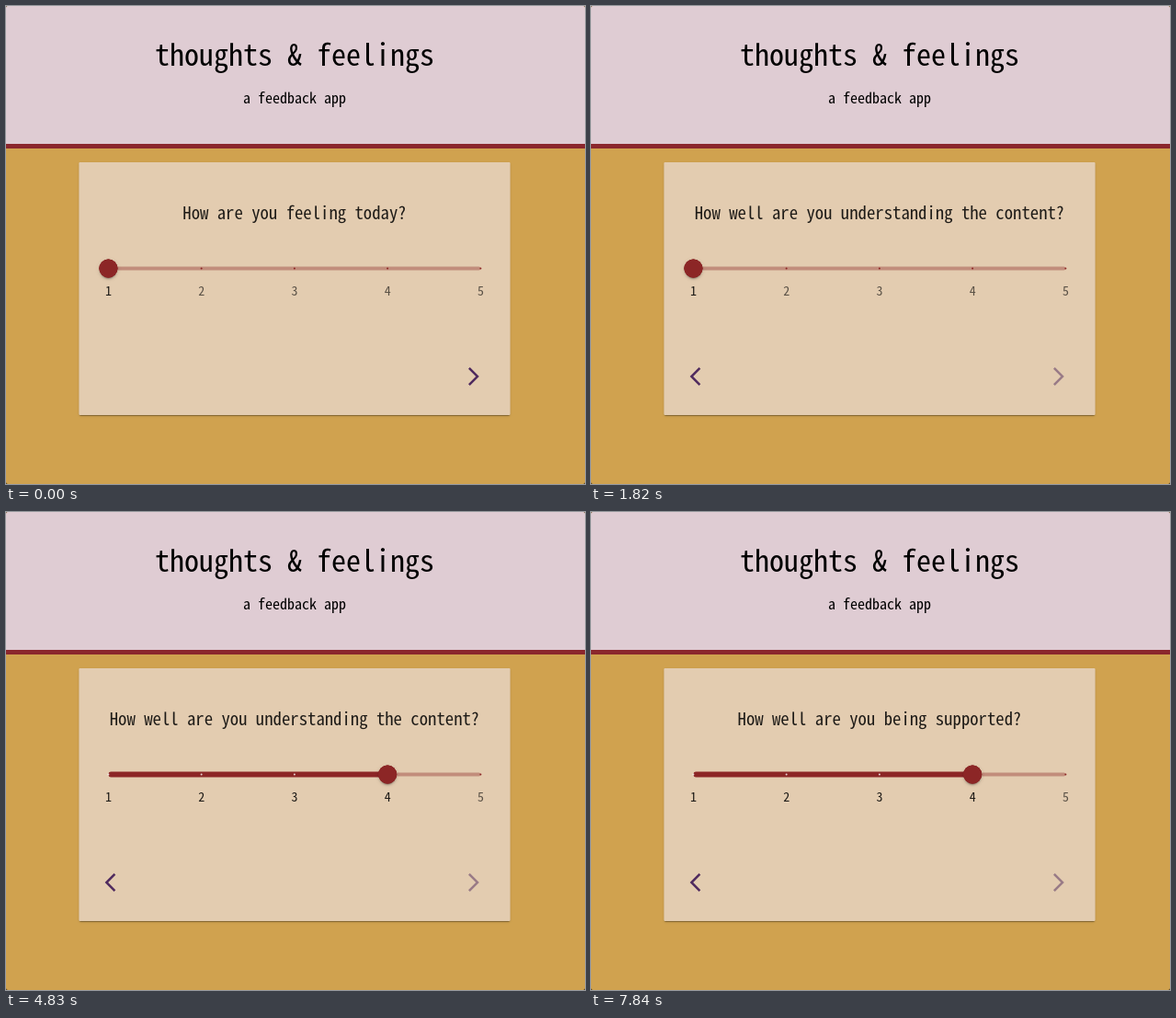
Write an HTML page with a canvas that moves like this. It is 630 px wide and 520 px high and loops after 8000 ms.

```html
<!DOCTYPE html>
<html lang="en">
<head>
<meta charset="utf-8">
<title>thoughts &amp; feelings</title>
<style>
  html, body { margin: 0; width: 100%; height: 100%; overflow: hidden; background: #2b2119; }
  canvas, svg { position: absolute; left: 0; top: 0; width: 630px; height: 520px; }
  text {
    font-family: "Noto Sans Mono CJK JP", "Noto Sans Mono CJK SC", "Noto Sans Mono", "DejaVu Sans Mono", monospace;
    font-size: calc(var(--size) * var(--fit, 1));
    text-anchor: middle;
    white-space: pre;
  }
  .title { --size: 32px; }
  .sub { --size: 16px; }
  .question { --size: 18.72px; fill-opacity: .87; }
  .label { --size: 14px; }
</style>
</head>
<body>
<canvas width="630" height="520"></canvas>
<svg viewBox="0 0 630 520">
  <text class="title" x="314" y="64.5">thoughts &amp; feelings</text>
  <text class="sub" x="314" y="105.5">a feedback app</text>
  <text class="question" x="314" y="232"></text>
</svg>
<script>
const LOOP = 8000, STEP = 70, EASE_MS = 150;
const RED = '#8c2626', CARD = '#e3ccb0', PURPLE = '#4f2a5e';
const LEFT = 111.4, GAP = 101.25, RAIL_Y = 285.5;
const NEXT = new Path2D('M6.23 20.23 8 22l10-10L8 2 6.23 3.77 14.46 12z');
const BACK = new Path2D('M11.67 3.87 9.9 2.1 0 12l9.9 9.9 1.77-1.77L3.54 12z');

// slide: thumb leaves 1; calm: halo fades; hover / unhover: next arrow dims and recovers
const pages = [
  { from: 0, text: 'How are you feeling today?', slide: 413, calm: 765, unhover: 0, hover: 980 },
  { from: 1820, text: 'How well are you understanding the content?', slide: 3405, calm: 3848, unhover: 2240, hover: 4830 },
  { from: 5950, text: 'How well are you being supported?', slide: 6925, calm: 7550, unhover: 6370, hover: 7840 }
];

const ctx = document.querySelector('canvas').getContext('2d');
const svg = document.querySelector('svg');
const question = document.querySelector('.question');

// Keep the half-em pitch whichever monospaced font is present.
ctx.font = '100px ' + getComputedStyle(question).fontFamily;
svg.style.setProperty('--fit', 50 / ctx.measureText('0').width);

const stopX = i => LEFT + i * GAP;
const labels = [0, 1, 2, 3, 4].map(i => {
  const el = document.createElementNS('http://www.w3.org/2000/svg', 'text');
  el.setAttribute('class', 'label');
  el.setAttribute('x', stopX(i));
  el.setAttribute('y', 314.5);
  el.textContent = i + 1;
  return svg.appendChild(el);
});

// cubic-bezier(.4, 0, .2, 1)
function ease(x) {
  if (x <= 0) return 0;
  if (x >= 1) return 1;
  let lo = 0, hi = 1;
  for (let i = 0; i < 24; i++) {
    const s = (lo + hi) / 2, r = 1 - s;
    if (1.2 * r * r * s + 0.6 * r * s * s + s * s * s < x) lo = s; else hi = s;
  }
  return lo * lo * (3 - 2 * lo);
}

function fillRound(x, y, w, h, r, color) {
  ctx.fillStyle = color;
  ctx.beginPath();
  ctx.roundRect(x, y, w, h, r);
  ctx.fill();
}

function raised(x, y, w, h, r, color, shadows) {
  for (const [dy, blur, spread, alpha] of shadows) {
    ctx.save();
    ctx.shadowColor = `rgba(0,0,0,${alpha})`;
    ctx.shadowOffsetY = dy;
    ctx.shadowBlur = blur;
    fillRound(x - spread, y - spread, w + 2 * spread, h + 2 * spread, Math.max(0, r + spread), color);
    ctx.restore();
  }
  fillRound(x, y, w, h, r, color);
}

function icon(path, x, y, alpha) {
  ctx.save();
  ctx.translate(x, y);
  ctx.globalAlpha = alpha;
  ctx.fillStyle = PURPLE;
  ctx.fill(path);
  ctx.restore();
}

function backdrop() {
  ctx.clearRect(0, 0, 630, 520);
  fillRound(0, 0, 630, 520, 2, '#d0a24f');
  fillRound(0, 0, 630, 150, [2, 2, 0, 0], '#dfccd3');
  ctx.fillStyle = '#8b272d';
  ctx.fillRect(0, 150, 630, 5);
  raised(79.7, 170, 468.6, 275, 1, CARD, [[2, 1, -1, .2], [1, 1, 0, .14], [1, 3, 0, .12]]);
}

function slider(moved, halo, active) {
  const x = LEFT + moved * 3 * GAP;
  ctx.globalAlpha = .38;
  fillRound(LEFT, RAIL_Y - 2, 4 * GAP, 4, 2, RED);
  ctx.globalAlpha = 1;
  if (active) fillRound(LEFT, RAIL_Y - 3, x - LEFT, 6, 3, RED);
  for (let i = 0; i < 5; i++) {
    const on = active ? i < 4 : i === 0;
    ctx.globalAlpha = on ? .8 : 1;
    fillRound(stopX(i) - 1, RAIL_Y - 1, 2, 2, 1, on ? '#fff' : RED);
    labels[i].style.fillOpacity = on ? .87 : .6;
  }
  ctx.globalAlpha = .16 * halo;
  const r = 10 + 8 * halo;
  fillRound(x - r, RAIL_Y - r, 2 * r, 2 * r, r, RED);
  ctx.globalAlpha = 1;
  raised(x - 10, RAIL_Y - 10, 20, 20, 10, RED, [[3, 1, -2, .2], [2, 2, 0, .14], [1, 5, 0, .12]]);
}

function draw(now) {
  const t = Math.floor(now % LOOP / STEP) * STEP;
  const page = pages.findLast(p => t >= p.from);
  const moved = ease((t - page.slide) / EASE_MS);
  const active = moved > .004;
  const halo = active ? moved * (1 - ease((t - page.calm) / EASE_MS)) : 0;

  backdrop();
  if (question.textContent !== page.text) question.textContent = page.text;
  slider(active ? moved : 0, halo, active);
  if (page.from) icon(BACK, 107.6, 391, 1);
  icon(NEXT, 496.8, 391, t < page.unhover || t >= page.hover ? .5 : 1);
}

const start = performance.now();
function tick() {
  draw(performance.now() - start);
  requestAnimationFrame(tick);
}
tick();
</script>
</body>
</html>
```
